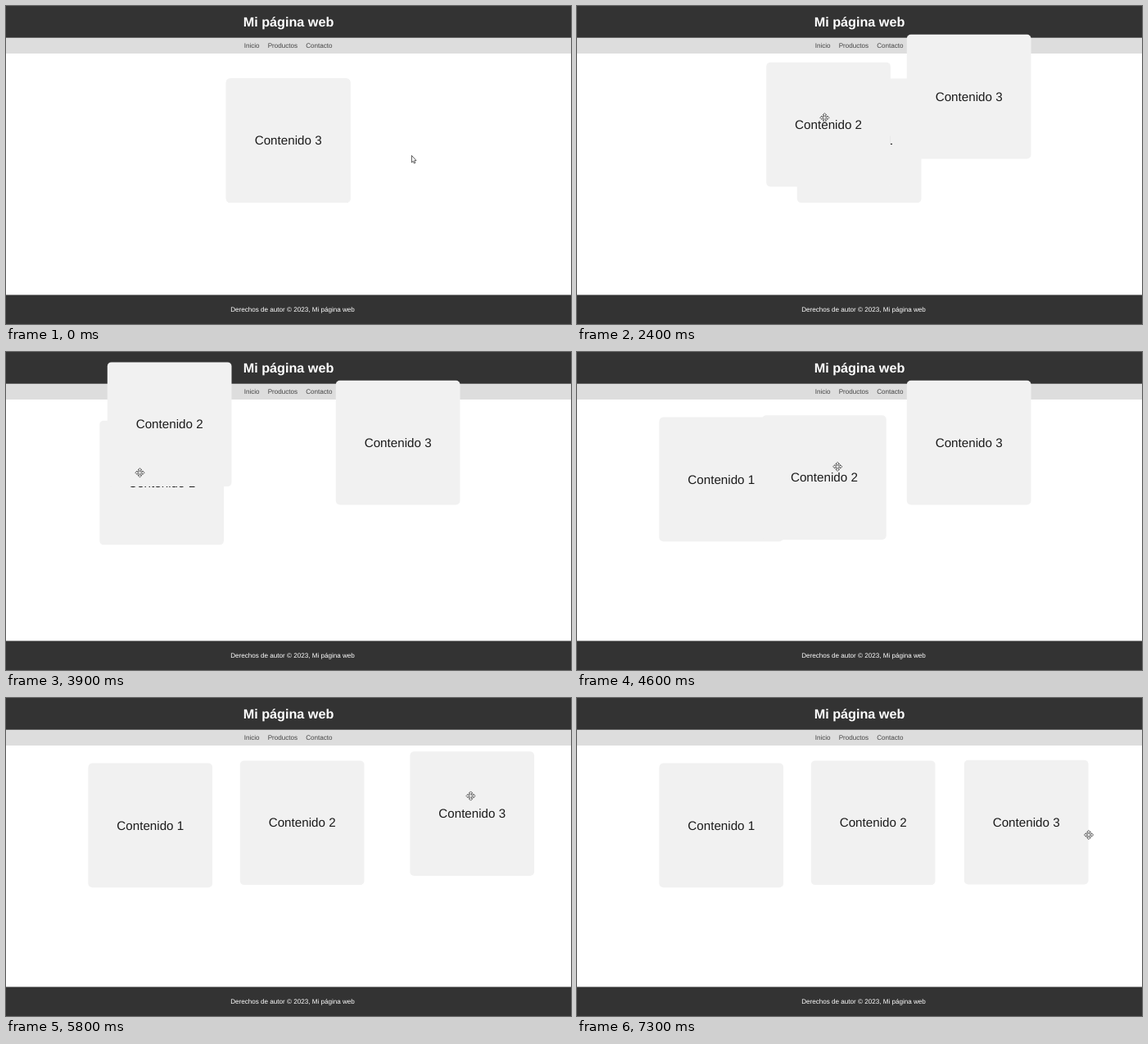
Animation of 690x388 px, one loop 7.8 s. Source, as an HTML page with a canvas:

```html
<!DOCTYPE html>
<html lang="es">
<head>
<meta charset="utf-8">
<title>Mi página web</title>
<style>
  html, body { margin: 0; width: 100%; height: 100%; overflow: hidden; background: #fff; }
  canvas { display: block; }
</style>
</head>
<body>
<canvas id="stage" width="690" height="388"></canvas>
<script>
const ctx = document.getElementById('stage').getContext('2d');
const W = 690, H = 388, LOOP = 7800, STEP = 100;
const SIZE = 151.7, HOME = { x: 268.8, y: 88.4 };
const FONT = '"Liberation Sans", Arial, sans-serif';
const REST = { x: 495, y: 182 };

// Eased pointer moves, times in steps; a move with a card drags it along.
// bend bows the path up (negative) or down.
const move = (start, end, x, y, card = 0, bend = 0) => ({ start, end, x, y, card, bend });
const moves = [
  move(7, 11, 396, 143),
  move(11, 18, 530, 89.4, 3, -4.7),
  move(20, 21, 511, 95),
  move(22, 22.5, 340, 156),
  move(22.5, 27, 195, 80, 2),
  move(28, 30, 285, 141),
  move(30, 32, 318, 152),
  move(32, 40.5, 149.6, 143.2, 1, 13),
  move(41, 43, 216, 75),
  move(43, 48.1, 378, 139, 2, 26.7),
  move(51, 54, 477, 89),
  move(54, 58.6, 572, 121, 3),
  move(59, 66, 547, 130, 3),
  move(67, 73, 625, 167)
];

function smooth(u) {
  u = Math.min(1, u);
  return u * u * (3 - 2 * u);
}

function pose(t) {
  const pointer = { ...REST };
  const cards = [1, 2, 3].map(() => ({ ...HOME }));
  for (const m of moves) {
    if (t <= m.start) break;
    const k = smooth((t - m.start) / (m.end - m.start));
    const dx = (m.x - pointer.x) * k;
    const dy = (m.y - pointer.y) * k + m.bend * Math.sin(Math.PI * k);
    for (const p of [pointer, cards[m.card - 1]]) {
      if (!p) continue;
      p.x += dx;
      p.y += dy;
    }
  }
  return { pointer, cards };
}

function rect(y, h, color) {
  ctx.fillStyle = color;
  ctx.fillRect(0, y, W, h);
}

function text(str, x, y, size, color, align = 'center', weight = '') {
  ctx.font = `${weight} ${size}px ${FONT}`;
  ctx.textAlign = align;
  ctx.textRendering = 'geometricPrecision';
  ctx.fillStyle = color;
  ctx.fillText(str, x, y);
}

function drawPage() {
  rect(0, H, '#fff');
  rect(0, 58, '#ddd');
  rect(0, 38.7, '#333');
  rect(352.5, 36, '#333');
  text('Mi página web', 345, 25, 16.2, '#fff', 'center', 'bold');
  text('Inicio', 290.7, 51, 8.1, '#444', 'left');
  text('Productos', 319.7, 51, 8.1, '#444', 'left');
  text('Contacto', 366.2, 51, 8.1, '#444', 'left');
  text('Derechos de autor © 2023, Mi página web', 350, 372.8, 8.1, '#fff');
}

function drawCard({ x, y }, i) {
  ctx.fillStyle = '#f1f1f1';
  ctx.beginPath();
  ctx.roundRect(x, y, SIZE, SIZE, 5);
  ctx.fill();
  text('Contenido ' + (i + 1), x + SIZE / 2, y + 81, 15.2, '#1c1c1c');
}

function shape(points, width) {
  ctx.beginPath();
  for (const [x, y] of points) ctx.lineTo(x, y);
  ctx.closePath();
  ctx.fillStyle = '#fff';
  ctx.strokeStyle = '#333';
  ctx.lineWidth = width;
  ctx.fill();
  ctx.stroke();
}

function drawPointer({ x, y }, overCard) {
  ctx.save();
  ctx.translate(x, y);
  if (overCard) {
    const arm = [[-0.9, -0.9], [-0.9, -3.3], [-2.3, -3.3], [0, -5.6], [2.3, -3.3], [0.9, -3.3]];
    const cross = [];
    for (let i = 0; i < 4; i++) {
      const c = Math.cos(i * Math.PI / 2), s = Math.sin(i * Math.PI / 2);
      for (const [px, py] of arm) cross.push([px * c - py * s, px * s + py * c]);
    }
    shape(cross, 0.75);
  } else {
    shape([[0.4, 0.4], [0.4, 9], [2.2, 7.3], [3.4, 10], [4.8, 9.4], [3.6, 6.8], [6, 6.5]], 0.8);
  }
  ctx.restore();
}

function isOver(p, card) {
  const reach = SIZE / 2 + 1;
  return Math.abs(p.x - card.x - SIZE / 2) <= reach &&
         Math.abs(p.y - card.y - SIZE / 2) <= reach;
}

function draw(now) {
  const { pointer, cards } = pose(Math.floor((now % LOOP) / STEP));
  drawPage();
  cards.forEach(drawCard);
  drawPointer(pointer, cards.some(c => isOver(pointer, c)));
}

const start = performance.now();
function tick() {
  draw(performance.now() - start);
  requestAnimationFrame(tick);
}
tick();
</script>
</body>
</html>
```
